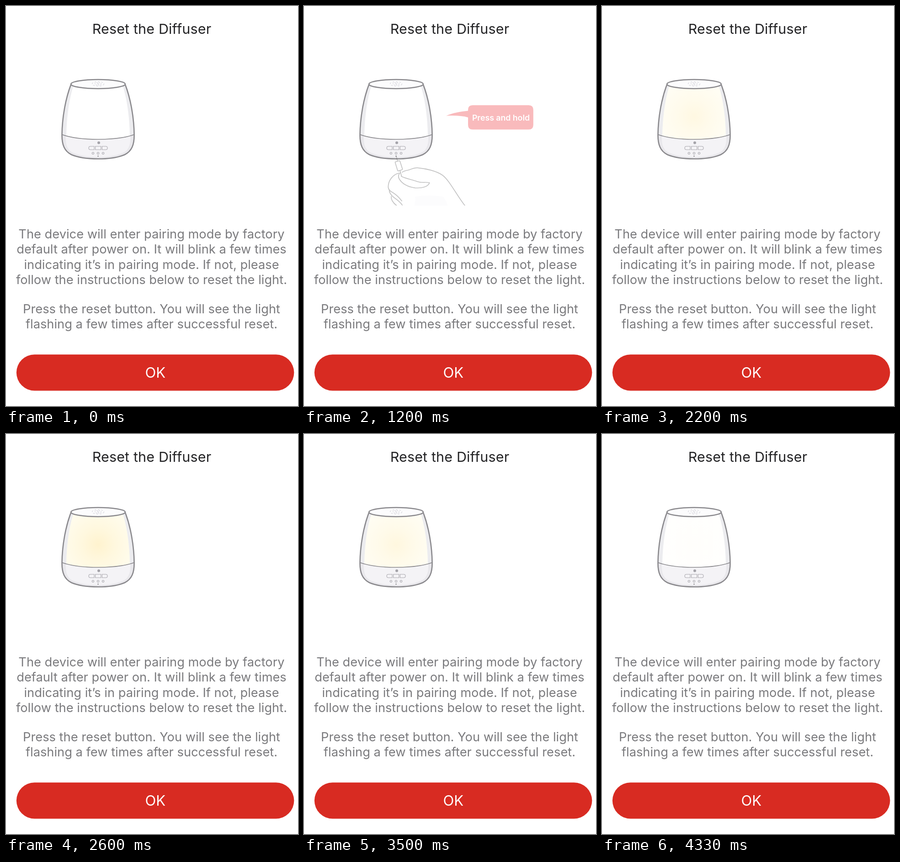
Recreate the animation shown at these times as an HTML page. Size 639 px wide and 876 px high, loop 4.46 s.

```html
<!DOCTYPE html>
<html lang="en">
<head>
<meta charset="utf-8">
<title>Reset the Diffuser</title>
<style>
  html, body { margin: 0; width: 100%; height: 100%; overflow: hidden; background: #fff; }
  svg { display: block; width: 100vw; height: 100vh; }
  text { font-family: Inter, Roboto, sans-serif; text-anchor: middle; }
  .title { font-size: 30.4px; letter-spacing: .2px; fill: #232325; }
  .body { font-size: 27.2px; letter-spacing: .035px; fill: #7a7a7d; }
  .ok { font-size: 31px; fill: #fff; }
  .tip { font-size: 17.7px; font-weight: 600; fill: #fff; }
  .line { fill: none; stroke: #8a898d; stroke-width: 2.6; stroke-linejoin: round; }
  .thin { fill: none; stroke: #aaa9af; stroke-width: 1.1; }
  .vent { fill: none; stroke: #dddce2; stroke-width: 1.5; }
  .pen { fill: none; stroke: #5a5a5c; stroke-width: 1.7; stroke-linecap: round; stroke-linejoin: round; }
  #hand, #light { opacity: 0; }
</style>
</head>
<body>
<svg viewBox="0 0 639 876">
  <defs>
    <path id="shell" d="M142.5 171 C130.5 202 123 243 122.5 281 C122 304 128 318 143 325.5 C158 332 180 334.8 201.5 334.8 C223 334.8 245 332 260 325.5 C275 318 281 304 280.5 281 C280 243 272.5 202 260.5 171 Z"/>
    <path id="panel" d="M147 176 C138 205 132.5 246 132 284 C150 290 178 292 201.5 292 C225 292 253 290 271 284 C270.5 246 265 205 256 176 Z"/>
    <radialGradient id="glow" gradientUnits="userSpaceOnUse" cx="201.5" cy="242" r="82">
      <stop offset="0" stop-color="#ffe599"/>
      <stop offset=".45" stop-color="#fff0bb"/>
      <stop offset="1" stop-color="#fff9da"/>
    </radialGradient>
    <clipPath id="shellClip"><use href="#shell"/></clipPath>
    <clipPath id="handClip"><rect x="170" y="320" width="200" height="116.3"/></clipPath>
  </defs>

  <text class="title" x="319" y="60.5">Reset the Diffuser</text>

  <g id="diffuser">
    <use href="#shell" fill="#ececef"/>
    <use href="#panel" fill="#fff"/>
    <use id="light" href="#panel" fill="url(#glow)"/>
    <g clip-path="url(#shellClip)">
      <path fill="#e9e8ec" d="M120 281 C145 290 175 292 201.5 292 C228 292 258 290 283 281 V340 H120 Z"/>
      <path fill="#f4f3f6" d="M131 285 C150 290 178 292 201.5 292 C225 292 253 290 272 285 C273 305 268 317 255 322 C240 328 220 331 201.5 331 C183 331 163 328 148 322 C135 317 130 305 131 285 Z"/>
      <path class="line" style="stroke-width:1.5" d="M121 281 C145 290 175 292 201.5 292 C228 292 258 290 282 281"/>
    </g>
    <use href="#shell" class="line"/>
    <ellipse class="line" style="fill:#fcfcfd" cx="201.5" cy="171" rx="59.3" ry="10"/>
    <ellipse class="vent" cx="201.5" cy="170.5" rx="13" ry="4.8" stroke-dasharray="4 3.2"/>
    <ellipse class="vent" cx="201.5" cy="170.5" rx="7" ry="2.5" stroke-dasharray="3 2"/>
    <circle cx="201.5" cy="170.5" r="1.4" fill="#dddce2"/>

    <circle cx="203" cy="299.5" r="3" fill="#a5a4aa"/>
    <path class="thin" d="M193 307.3 H185 Q181 307.3 181 311 Q181 314.8 185 314.8 H193 Z M195.6 307.3 H207.8 V314.8 H195.6 Z M210.3 307.3 H218 Q222 307.3 222 311 Q222 314.8 218 314.8 H210.3 Z"/>
    <g class="thin">
      <circle cx="190.4" cy="322.4" r="2.1"/>
      <circle cx="201.5" cy="322.4" r="2.1"/>
      <circle cx="212.5" cy="322.4" r="2.1"/>
    </g>
    <circle cx="201.5" cy="328.8" r="1.3" fill="#8a898d"/>
  </g>

  <g id="hand">
    <g clip-path="url(#handClip)">
      <path fill="#f7f6fa" d="M242 418 C262 414 290 415 305 418 C309 424 313 430 314 437 H242 C241 430 246 425 242 418 Z"/>
      <g class="pen">
        <path d="M201.8 329 L204.5 339.5 M210.3 361 L213.5 373"/>
        <path d="M201 341 L207.8 338.9 Q209.5 338.4 210 340 L215.3 356.6 Q215.8 358.3 214.2 358.8 L207 361.1 Q205.3 361.6 204.8 360 L199.6 343 Q199.2 341.5 201 341 Z" fill="#fff"/>
        <path d="M215 364 C220 360 226 360.5 231 358.5 C237 356 242 354 248.5 354.3 C267 356 290 361.5 303 370.5 C319 382.5 333 413 352 437"/>
        <path d="M207.5 366 C195 369 185 381 184.3 395 C184 403 189 405.5 195 409 C203 414 209.5 421 214 427"/>
        <path d="M186.5 402 C186 409 190 414 197 419.5 C205 425 211 430 215 436"/>
        <path d="M191 417 C190 424 195 431 202.5 437"/>
        <path d="M210.5 365 C206.5 369 206 374 208 378 C214 389 227 396.5 243 398.3 C259 399.5 272 395.5 274.7 387 C265 385 258 388 248 384.5 C236 380 224 378.5 213 373"/>
      </g>
    </g>
    <path fill="#ef4448" d="M311 240.5 C326 234 342 231 359 229.5 V227.5 Q359 217.3 369 217.3 H491.7 Q501.8 217.3 501.8 227.5 V260.5 Q501.8 270.6 491.7 270.6 H369 Q359 270.6 359 260.5 V244 C345 240 328 239.5 311 240.5 Z"/>
    <text class="tip" x="431" y="250.5">Press and hold</text>
  </g>

  <g class="body">
    <text x="318.5" y="508.7">The device will enter pairing mode by factory</text>
    <text x="318.5" y="542.3">default after power on. It will blink a few times</text>
    <text x="318.5" y="575.8">indicating it’s in pairing mode. If not, please</text>
    <text x="318.5" y="609.3">follow the instructions below to reset the light.</text>
    <text x="318.5" y="672.5">Press the reset button. You will see the light</text>
    <text x="318.5" y="706">flashing a few times after successful reset.</text>
  </g>

  <rect x="22.8" y="763.2" width="607.6" height="79.2" rx="39.6" fill="#d82b22"/>
  <text class="ok" x="326.7" y="813.5">OK</text>
</svg>

<script>
  const LOOP = 4460, STEP = 100, LAST = 4330;
  const FADE = 500, SHOW = 60, HIDE = 905;
  const BLINK_START = 1420, BLINK = 950;
  const hand = document.getElementById('hand');
  const light = document.getElementById('light');
  const start = performance.now();

  const ease = u => {
    u = Math.min(1, Math.max(0, u));
    return u * u * (3 - 2 * u);
  };

  // The picture advances in tenths of a second, with a longer hold at the end.
  function snap(t) {
    if (t >= LAST) return LAST;
    if (t >= 600 && t < 1000) return 600;
    return Math.min(Math.floor(t / STEP) * STEP, 4200);
  }

  function draw() {
    const t = snap((performance.now() - start) % LOOP);
    hand.style.opacity = t < STEP ? 0 : ease((t - SHOW) / FADE) - ease((t - HIDE) / FADE);
    light.style.opacity = t < BLINK_START ? 0
      : (1 - Math.cos(2 * Math.PI * (t - BLINK_START) / BLINK)) / 2;
    requestAnimationFrame(draw);
  }
  draw();
</script>
</body>
</html>
```
